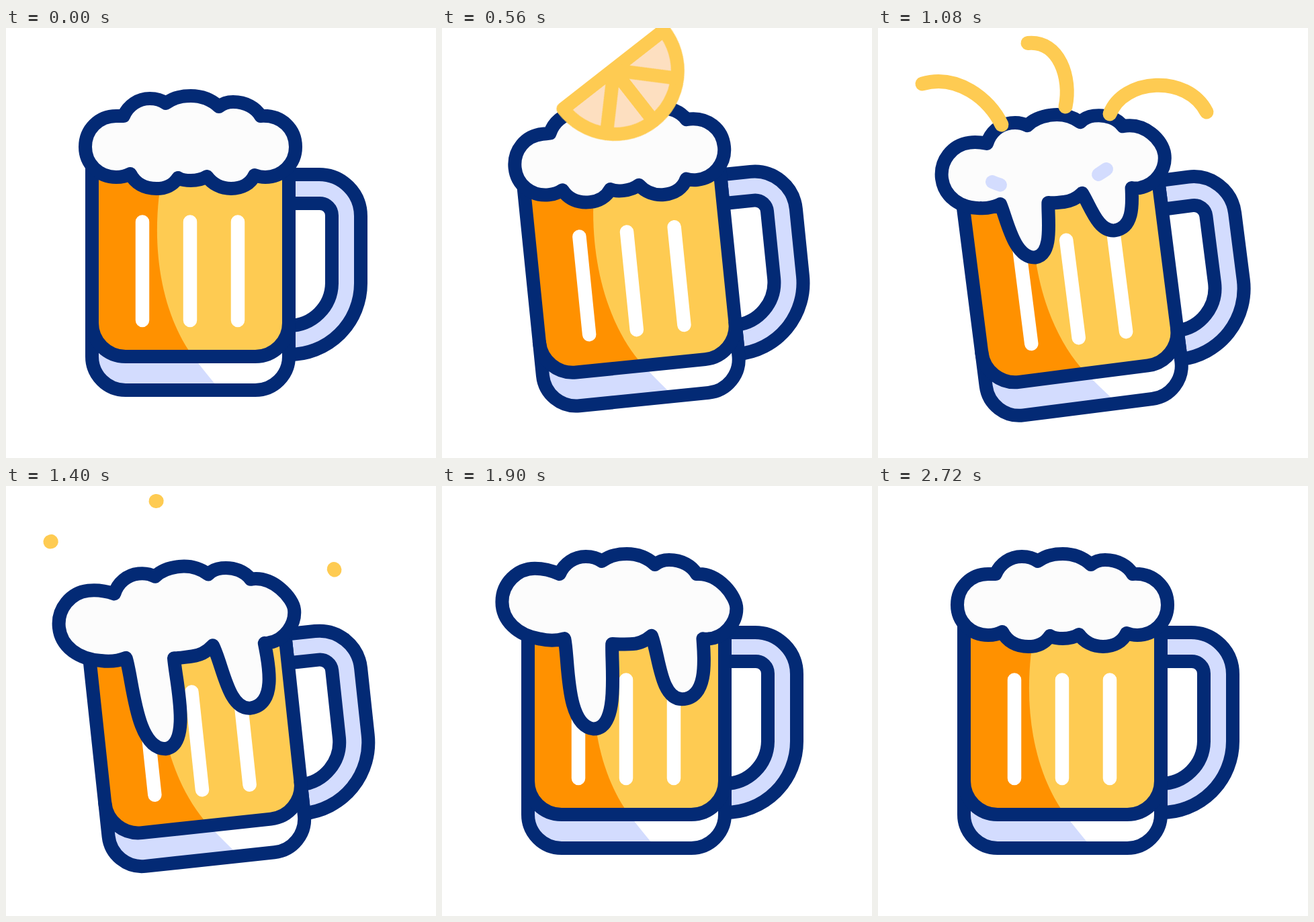
An HTML page for the animation above (3240 ms loop, 640 px wide and 640 px high).

```html
<!DOCTYPE html>
<html lang="en">
<head>
<meta charset="utf-8">
<title>Beer and lemon</title>
<style>
html, body { margin: 0; width: 100%; height: 100%; overflow: hidden; background: #fff; }
svg { display: block; width: 100%; height: 100%; }

:root { --navy: #032a75; --amber: #ff9100; --gold: #fecb52; --lilac: #d3dcfe; }
.line { fill: none; stroke: var(--navy); stroke-width: 20; stroke-linejoin: round; }
.lilac { fill: var(--lilac); }
.gold { fill: var(--gold); }
.bars { stroke: #fff; stroke-width: 20.5; stroke-linecap: round; }
.lemon { fill: #fddfc0; stroke: var(--gold); stroke-width: 20; stroke-linejoin: round; }
.arcs, .marks { fill: none; stroke: var(--gold); stroke-width: 21; stroke-linecap: round; }
.marks { stroke: var(--lilac); stroke-width: 20; }

.mug, .foam, .lemon, .arcs path, .marks path {
  animation: 3240ms cubic-bezier(.333, 0, .667, 1) infinite;
}
.mug { transform-origin: 274px 362px; animation-name: tilt, push; }
.foam { fill: #fcfcfc; animation-name: drip; }
.lemon { animation-name: drop; }
.arcs path { animation-name: splash; }
.marks path { animation-name: crease; }
.arcs { animation: arcsOn 3240ms step-end infinite; }
.marks { animation: marksOn 3240ms step-end infinite; }

@keyframes tilt {
  0%, 6.79%, 56.17%, to { rotate: 0deg; }
  21.6%, 38.89% { rotate: -7.25deg; }
}
@keyframes push {
  0%, 11.11%, 50%, to { translate: 0 0; }
  22.84%, 38.89% { translate: 15.5px 26.7px; }
}
@keyframes drip {
  0%, 20.37%, 82.72%, to {
    d: path("M175 131C182 115 197 105 214 105C223 105 231 107 238 112C248 104 261 101 275 101C291 101 306 107 317 117C323 112 330 110 338 110C357 110 372 119 379 131C411 129 431 151 431 177C431 202 411 222 386 222C380 222 375 221 370 219C364 232 351 239 335 239C320 239 307 232 299 221C291 226 283 227 275 227C268 227 261 226 256 223C249 234 237 239 224 239C206 239 192 231 185 217C178 221 171 222 164 222C138 222 118 202 118 177C118 151 138 131 164 131C168 131 171 131 175 131Z");
  }
  45.68%, 53.7% {
    d: path("M175 131C182 115 197 105 214 105C223 105 231 107 238 112C248 104 261 101 275 101C291 101 306 107 317 117C323 112 330 110 338 110C357 110 372 119 379 131C413 129 439 166 439 183C439 204 421 226 397 228C395 228 393 229 390 228C392 252 402 323 359 324C325 323 325 255 313 223C305 230 293 236 280 236C271 236 262 237 253 236C252 270 267 371 226 372C181 367 189 261 182 228C171 231 156 231 144 228C110 222 87 200 87 172C87 144 110 122 136 122C151 122 164 126 175 131Z");
  }
}
@keyframes drop {
  0%, 6.79% {
    transform: translate(257px, -130px) rotate(-38deg);
    animation-timing-function: cubic-bezier(.333, 0, .667, .333);
  }
  22.84%, to { transform: translate(257px, 322px) rotate(-38deg); }
}
@keyframes splash {
  0%, 22.84% { stroke-dasharray: 0 300; stroke-dashoffset: 0; }
  32.1%, 33.33% { stroke-dasharray: 100 300; stroke-dashoffset: 0; }
  43.83%, to { stroke-dasharray: 0 300; stroke-dashoffset: -100; }
}
@keyframes crease {
  0%, 21.6% { stroke-dasharray: 0 300; stroke-dashoffset: 0; }
  25.31% { stroke-dasharray: 100 300; stroke-dashoffset: 0; }
  37.65%, to { stroke-dasharray: 0 300; stroke-dashoffset: -100; }
}
@keyframes arcsOn {
  0%, 43.8%, to { opacity: 0; }
  23.1% { opacity: 1; }
}
@keyframes marksOn {
  0%, 37.6%, to { opacity: 0; }
  21.8% { opacity: 1; }
}
</style>
</head>
<body>
<svg viewBox="0 0 640 640">
  <defs>
    <path id="glass" d="M128 200V439a50 50 0 0 0 50 50H371a50 50 0 0 0 50 -50V200"/>
    <path id="base" d="M128 437V489a50 50 0 0 0 50 50H371a50 50 0 0 0 50 -50V437"/>
    <path id="shine" d="M236 200C213 305 226 410 272 480Q290 505 318 538H440V200Z"/>
    <clipPath id="inGlass"><use href="#glass"/></clipPath>
    <clipPath id="inBase"><use href="#base"/></clipPath>
    <clipPath id="aboveFoam"><path d="M0 0H640V207H345Q260 262 165 227H0Z"/></clipPath>
  </defs>

  <g class="mug">
    <path class="line" style="fill:var(--lilac)" d="M421 218H466a62 62 0 0 1 62 62V380a106 106 0 0 1 -107 106V443a64 64 0 0 0 64 -63V279a18 18 0 0 0 -18 -18H421Z"/>
    <g clip-path="url(#inBase)">
      <use href="#base" class="lilac"/>
      <use href="#shine" fill="#fff"/>
    </g>
    <use href="#glass" fill="var(--amber)"/>
    <g clip-path="url(#inGlass)"><use href="#shine" class="gold"/></g>
    <use href="#base" class="line"/>
    <use href="#glass" class="line"/>
    <path class="bars" d="M203 288.500V435M274 288.500V435M345 288.500V435"/>
    <path class="line foam"/>
  </g>

  <g class="marks">
    <path pathLength="100" d="M215 240Q190 238 170 229"/>
    <path pathLength="100" d="M295 236Q320 224 340 210"/>
  </g>

  <g clip-path="url(#aboveFoam)">
    <g class="lemon">
      <path d="M-95 -3A95 97 0 0 0 95 -3Z"/>
      <path d="M0 -2L-66 65M0 -2V94M0 -2L66 65"/>
    </g>
  </g>

  <g class="arcs">
    <path pathLength="100" d="M184 144C166 105 117 68 66 83"/>
    <path pathLength="100" d="M279 117C288 75 270 18 223 22.500"/>
    <path pathLength="100" d="M345 128C365 75 460 68 489 125"/>
  </g>
</svg>
</body>
</html>
```
